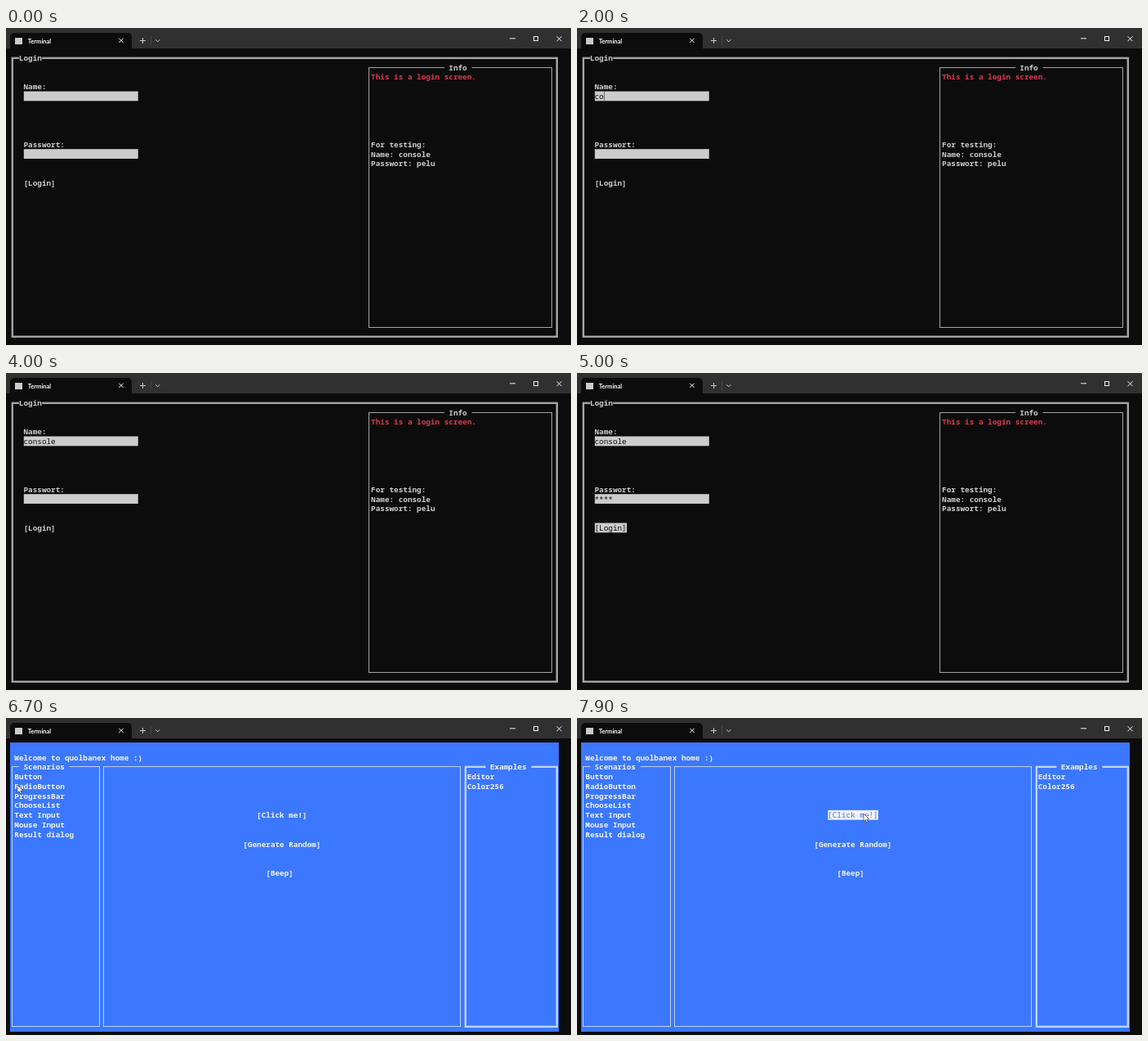
Recreate the animation shown at these times as an HTML page with a canvas. Size 692 by 388 pixels, loop 8 s.

```html
<!DOCTYPE html>
<html>
<head>
<meta charset="utf-8">
<style>
  html, body { margin: 0; width: 100%; height: 100%; overflow: hidden; background: #0c0c0c; }
  canvas { display: block; }
</style>
</head>
<body>
<canvas id="stage" width="692" height="388"></canvas>
<script>
const ctx = document.getElementById('stage').getContext('2d');
const LOOP = 8000, STEP = 100;
const CELL_W = 5.6, CELL_H = 11.78, LEFT = 5, TOP = 30.4;
const BLACK = '#0c0c0c', GREY = '#cccccc', BLUE = '#3b78ff', WHITE = '#f2f2f2', RED = '#d83a4e';
const GREY_LINE = '#a4a4a4', BLUE_LINE = '#bfd2fb';
const NAME = 'console';
const NAME_KEYS = [1800, 2000, 2300, 2500, 2600, 2800, 3000];
const PASS_KEYS = [4100, 4300, 4500, 4700];
const SCENARIOS = ['Button', 'RadioButton', 'ProgressBar', 'ChooseList', 'Text Input', 'Mouse Input', 'Result dialog'];

// Pointer waypoints: time, x, y
const FIELD_PATH = [[1000, 97, 83], [1200, 95, 81]];
const HOME_PATH = [[6100, 12.5, 80.5], [6200, 14, 82], [6700, 14, 82], [6800, 20, 77], [7300, 367, 128],
  [7500, 354, 119], [7800, 351, 117]];

const colX = c => LEFT + c * CELL_W;
const rowY = r => TOP + r * CELL_H;
const typed = (keys, t) => keys.filter(k => k <= t).length;

function fill(x, y, w, h, color) {
  ctx.fillStyle = color;
  ctx.fillRect(x, y, w, h);
}

function print(text, col, row, color, back, weight = 600) {
  if (back) fill(colX(col), rowY(row), text.length * CELL_W, CELL_H, back);
  ctx.fillStyle = color;
  ctx.font = weight + ' 9.33px "Noto Sans Mono", monospace';
  [...text].forEach((ch, i) => ctx.fillText(ch, colX(col + i) - .3, rowY(row) + 9.4));
}

function button(text, col, row, color, back, active) {
  if (active) print(text, col, row, back, color, 500);
  else print(text, col, row, color);
}

// Double borders are so tight that they read as one thicker line
function frame(c0, r0, c1, r1, color, double) {
  const inset = double ? .8 : .5;
  const snap = v => Math.floor(v) + inset;
  const x = snap(colX(c0 + .5)), y = snap(rowY(r0 + .5));
  ctx.strokeStyle = color;
  ctx.lineWidth = double ? 2.4 : 1;
  ctx.strokeRect(x, y, snap(colX(c1 + .5)) - x, snap(rowY(r1 + .5)) - y);
}

function line(color, ...points) {
  ctx.strokeStyle = color;
  ctx.lineWidth = 1;
  ctx.beginPath();
  points.forEach(([x, y]) => ctx.lineTo(x, y));
  ctx.stroke();
}

function cross(x, y, r) {
  line(WHITE, [x - r, y - r], [x + r, y + r]);
  line(WHITE, [x - r, y + r], [x + r, y - r]);
}

function titleBar() {
  fill(0, 0, 692, 25, '#303030');
  ctx.fillStyle = BLACK;
  ctx.beginPath();
  ctx.roundRect(5, 6, 149, 22, [5, 5, 0, 0]);
  ctx.fill();
  fill(11, 12, 9, 8, GREY);
  ctx.fillStyle = '#fff';
  ctx.font = '700 7.5px Lato, sans-serif';
  ctx.fillText('Terminal', 26.7, 18.7);
  cross(141, 15.3, 2.7);
  line(GREY, [164, 15.5], [171, 15.5]);
  line(GREY, [167.5, 12], [167.5, 19]);
  line('#464646', [177.5, 10], [177.5, 21]);
  line(GREY, [183.2, 14.2], [185.8, 16.8], [188.4, 14.2]);
  line(WHITE, [617, 12.8], [624, 12.8]);
  ctx.strokeStyle = WHITE;
  ctx.strokeRect(646.5, 10.5, 5, 5);
  cross(677.5, 13.2, 3);
}

function pointer(path, t) {
  if (t < path[0][0]) return;
  const next = path.findIndex(p => p[0] > t);
  const b = path.at(next), a = next > 0 ? path[next - 1] : b;
  const k = a === b ? 0 : (t - a[0]) / (b[0] - a[0]);
  const x = a[1] + (b[1] - a[1]) * k, y = a[2] + (b[2] - a[2]) * k;
  ctx.beginPath();
  [[0, 0], [0, 9.6], [2.2, 7.6], [3.8, 11], [5.3, 10.3], [3.8, 7], [6.8, 7]]
    .forEach(([dx, dy]) => ctx.lineTo(x + dx, y + dy));
  ctx.closePath();
  ctx.fillStyle = '#fff';
  ctx.fill();
  ctx.strokeStyle = '#222';
  ctx.lineWidth = .6;
  ctx.stroke();
}

function field(text, row, showCaret) {
  print(text.padEnd(25), 3, row, BLACK, GREY, 400);
  if (showCaret) fill(colX(3 + text.length), rowY(row), 1, CELL_H, '#666');
}

function login(t) {
  frame(0, 0, 119, 29, GREY_LINE, true);
  print('Login', 2, 0, GREY, BLACK);
  frame(78, 1, 118, 28, GREY_LINE);
  print(' Info ', 95, 1, GREY, BLACK);
  print('This is a login screen.', 79, 2, RED);
  ['For testing:', 'Name: ' + NAME, 'Passwort: pelu'].forEach((s, i) => print(s, 79, 9 + i, GREY));

  print('Name:', 3, 3, GREY);
  field(NAME.slice(0, typed(NAME_KEYS, t)), 4, t >= 1200 && t < 1500 || t >= 1800 && t < 3300);
  print('Passwort:', 3, 9, GREY);
  field('*'.repeat(typed(PASS_KEYS, t)), 10, t >= 3300 && t < 4000 || t >= 4100 && t < 5000);
  button('[Login]', 3, 13, GREY, BLACK, t >= 5000);
  if (t < 1800) pointer(FIELD_PATH, t);
}

function home(t) {
  fill(LEFT, 30, 672, 354, BLUE);
  print('Welcome to quolbanex home :)', 1, 1, WHITE);
  frame(0, 2, 19, 29, BLUE_LINE);
  print(' Scenarios ', 2, 2, WHITE, BLUE);
  SCENARIOS.forEach((s, i) => print(s, 1, 3 + i, WHITE));
  frame(20, 2, 98, 29, BLUE_LINE);
  frame(99, 2, 119, 29, BLUE_LINE, true);
  print(' Examples ', 104, 2, WHITE, BLUE);
  ['Editor', 'Color256'].forEach((s, i) => print(s, 100, 3 + i, WHITE));

  button('[Click me!]', 54, 7, WHITE, BLUE, t >= 7800);
  button('[Generate Random]', 51, 10, WHITE, BLUE);
  button('[Beep]', 56, 13, WHITE, BLUE);
  pointer(HOME_PATH, t);
}

const start = performance.now();
function draw() {
  const t = Math.floor((performance.now() - start) % LOOP / STEP) * STEP;
  fill(0, 0, 692, 388, BLACK);
  titleBar();
  (t < 5400 ? login : home)(t);
  requestAnimationFrame(draw);
}
draw();
</script>
</body>
</html>
```
